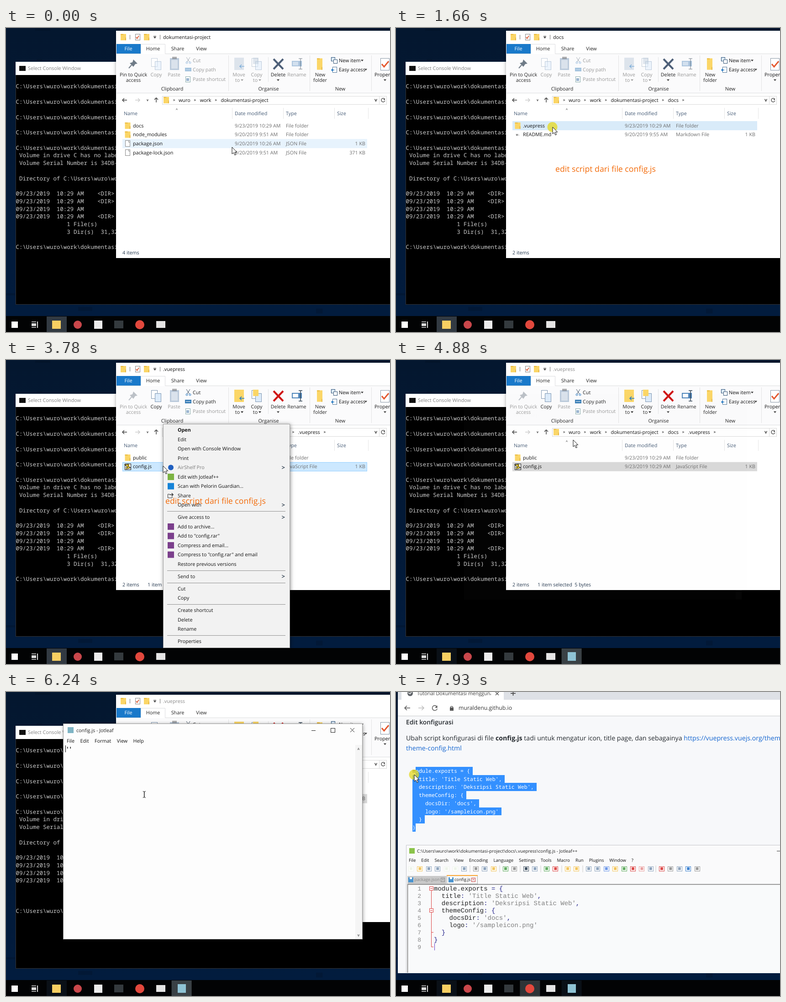
An HTML page with a canvas for the animation above (8000 ms loop, 841x666 px).

```html
<!DOCTYPE html>
<html lang="id">
<head>
<meta charset="utf-8">
<title>Edit konfigurasi</title>
<style>
html, body { margin: 0; width: 100%; height: 100%; overflow: hidden; background: #000; }
canvas { display: block; }
</style>
</head>
<body>
<canvas id="stage" width="841" height="666"></canvas>
<script>
const c = document.getElementById('stage').getContext('2d');
c.textRendering = 'geometricPrecision'; // keeps fractional glyph advances
const UI = '"Open Sans", sans-serif';
const MONO = '"Noto Sans Mono", monospace';
const COURIER = '"Liberation Mono", monospace';
const LOOP = 8000;
const USER = 'wuro';
const T = {
  openDocs: 900, openVuepress: 1960, tip: 2760, tipEnd: 3080, select: 3480, menu: 3600,
  noteEnd: 4460, menuEnd: 4860, editor: 4880, blur: 7150, browser: 7260, drag: 7480
};
const CLICKS = [[610, 700], [770, 860], [1660, 1750], [1820, 1910], [3480, 3600],
  [4750, 4850], [7110, 7200], [T.drag, LOOP]];
const PATH = [[20, 495, 261], [460, 343, 217], [2440, 343, 217], [2650, 311, 230], [3030, 311, 230],
  [3400, 344, 232], [3930, 344, 232], [4230, 388, 175], [5250, 388, 175], [6050, 302, 178],
  [6080, 302, 178], [6840, 309, 580], [6940, 309, 580], [7120, 288, 653], [7260, 288, 653],
  [7480, 44, 300], [7690, 157, 178], [7750, 157, 178], [7920, 40, 181]];
const CODE = ['module.exports = {', "  title: 'Title Static Web',", "  description: 'Deksripsi Static Web',",
  '  themeConfig: {', "    docsDir: 'docs',", "    logo: '/sampleicon.png'", '  }', '}'];
const FOLDERS = [
  [['folder', 'docs', '9/23/2019 10:29 AM', 'File folder', ''],
   ['folder', 'node_modules', '9/20/2019 9:51 AM', 'File folder', ''],
   ['file', 'package.json', '9/20/2019 10:26 AM', 'JSON File', '1 KB'],
   ['file', 'package-lock.json', '9/20/2019 9:51 AM', 'JSON File', '371 KB']],
  [['folder', '.vuepress', '9/23/2019 10:29 AM', 'File folder', ''],
   ['md', 'README.md', '9/20/2019 9:55 AM', 'Markdown File', '1 KB']],
  [['folder', 'public', '9/23/2019 10:29 AM', 'File folder', ''],
   ['js', 'config.js', '9/23/2019 10:29 AM', 'JavaScript File', '1 KB']]
];
// "-" is a separator, a trailing ">" marks a submenu
const MENU = ['Open', 'Edit', 'Open with Console Window', 'Print', 'AirShelf Pro>', 'Edit with Jotleaf++',
  'Scan with Pelorin Guardian...', 'Share', 'Open with>', '-', 'Give access to>', 'Add to archive...',
  'Add to "config.rar"', 'Compress and email...', 'Compress to "config.rar" and email',
  'Restore previous versions', '-', 'Send to>', '-', 'Cut', 'Copy', '-', 'Create shortcut', 'Delete',
  'Rename', '-', 'Properties'];

const clamp = u => Math.min(1, Math.max(0, u));
const easeOut = (t, a, b) => 1 - (1 - clamp((t - a) / (b - a))) ** 2;

function rect(x, y, w, h, color) { c.fillStyle = color; c.fillRect(x, y, w, h); }
function box(x, y, w, h, color) { c.strokeStyle = color; c.lineWidth = 1; c.strokeRect(x + .5, y + .5, w - 1, h - 1); }
function disc(x, y, r, color) { c.fillStyle = color; c.beginPath(); c.arc(x, y, r, 0, 7); c.fill(); }
function trace(points) {
  c.beginPath();
  for (let i = 0; i < points.length; i += 2) c.lineTo(points[i], points[i + 1]);
}
function line(points, color, width = 1) { trace(points); c.strokeStyle = color; c.lineWidth = width; c.stroke(); }
function poly(points, color) { trace(points); c.fillStyle = color; c.fill(); }
function text(s, x, y, color = '#111', size = 10.75, align = 'left', font = UI, weight = 400) {
  c.font = `${weight} ${size}px ${font}`;
  c.textAlign = align;
  c.fillStyle = color;
  c.fillText(s, x, y + size * .36);
  return x + c.measureText(s).width;
}
function words(list, x, y, gap, size) { for (const w of list) x = text(w, x, y, '#111', size) + gap; }
function chevron(x, y, dx, dy, color = '#555', width = 1.2) {
  line([x - dx - dy, y - dy - dx, x + dx, y + dy, x - dx + dy, y - dy + dx], color, width);
}
function down(x, y, color = '#333') { poly([x - 3, y - 1.5, x + 3, y - 1.5, x, y + 2], color); }
function arrow(x, y, dx, dy, color) {
  line([x - dx * 5, y - dy * 5, x + dx * 5, y + dy * 5], color, 1.5);
  line([x + dx - dy * 4, y + dy - dx * 4, x + dx * 5, y + dy * 5, x + dx + dy * 4, y + dy + dx * 4], color, 1.5);
}
function circleArrow(x, y, r, color) {
  c.strokeStyle = color; c.lineWidth = 1.4;
  c.beginPath(); c.arc(x, y, r, .3, 5.4); c.stroke();
  poly([x + r, y - r, x + r, y, x, y - 1], color);
}
function panel(x, y, w, h, color) {
  c.save();
  c.shadowColor = 'rgba(0,0,0,.45)'; c.shadowBlur = 8; c.shadowOffsetX = c.shadowOffsetY = 1;
  rect(x, y, w, h, color);
  c.restore();
}
function faded(on, draw) { c.save(); if (!on) c.globalAlpha *= .45; draw(); c.restore(); }

function folder(x, y, h = 14) {
  rect(x - 6, y - h / 2, 12, h, '#fbd667');
  rect(x - 6, y - h / 2, 6, 2, '#e9b93d');
  rect(x + 4, y + h / 2 - 6, 2, 6, '#e6b94a');
}
function sheet(x, y, w = 11, h = 14, fill = '#fff', edge = '#888') {
  rect(x - w / 2, y - h / 2, w, h, fill);
  box(Math.round(x - w / 2), Math.round(y - h / 2), w, h, edge);
}
function fileIcon(kind, x, y) {
  if (kind === 'folder') folder(x, y);
  else if (kind === 'md') text('M↓', x, y, '#555', 5.5, 'center', UI, 700);
  else {
    sheet(x, y, kind === 'js' ? 14 : 11, 14, '#fff', kind === 'js' ? '#111' : '#888');
    if (kind === 'js') {
      const scroll = [x + 3, y - 4, x - 3, y - 3, x + 3, y + 2, x - 4, y + 4];
      line(scroll, '#111', 4);
      line(scroll, '#f5d535', 2);
    } else line([x + 2, y - 7, x + 2, y - 3, x + 5, y - 3], '#888');
  }
}

function pointer(t) {
  let a = PATH[0];
  for (const b of PATH) {
    if (t < b[0]) {
      const u = clamp((t - a[0]) / (b[0] - a[0] || 1)), e = u * u * (3 - 2 * u);
      return [a[1] + (b[1] - a[1]) * e, a[2] + (b[2] - a[2]) * e];
    }
    a = b;
  }
  return [a[1], a[2]];
}

function desktop() {
  const g = c.createLinearGradient(0, 0, 0, 631);
  g.addColorStop(0, '#04172f'); g.addColorStop(1, '#021c3e');
  rect(0, 0, 841, 666, g);
  let seed = 7;
  const rnd = n => (seed = seed * 16807 % 2147483647) / 2147483647 * n;
  for (let i = 0; i < 60; i++) rect(rnd(841), rnd(631), 8 + rnd(40), 3 + rnd(8), 'rgba(0,12,30,.25)');
}

function terminal() {
  rect(21, 74, 820, 532, '#000');
  box(21, 74, 830, 532, '#333');
  rect(21, 74, 820, 29, '#fff');
  rect(29, 83, 14, 11, '#111');
  text('Select Console Window', 48, 88, '#808080');
  const home = `C:\\Users\\${USER}\\work\\dokumentasi-project`, prompt = home + '>';
  const entry = '09/23/2019  10:29 AM    ';
  [prompt, '', prompt, '', prompt, '', prompt, '', prompt + 'dir', ' Volume in drive C has no label.',
    ' Volume Serial Number is 34DB-', '', ' Directory of ' + home, '', entry + '<DIR>', entry + '<DIR>',
    entry, entry + '<DIR>', ' '.repeat(15) + '1 File(s)', ' '.repeat(15) + '3 Dir(s)  31,32', '', prompt
  ].forEach((s, i) => text(s, 21.5, 128 + i * 16.76, '#ccc', 12.41, 'left', MONO));
}

function ribbon(selected) {
  const ink = on => on ? '#222' : '#999';
  const label = (s, x, y, on = true) => text(s, x, y, ink(on), 10.75, 'center');
  rect(242, 57, 599, 85, '#fbfbfc');
  line([242, 56.5, 295, 56.5, 295.5, 35.5, 348.5, 35.5, 348.5, 56.5, 841, 56.5], '#dcdddf');
  line([242, 142.5, 841, 142.5], '#dcdddf');
  rect(242, 35, 53, 21, '#1979ca');
  text('File', 268, 45, '#fff', 10.75, 'center');
  label('Home', 322, 45); label('Share', 376, 45); label('View', 428, 45);
  for (const x of [487.5, 665.5, 800.5]) line([x, 60, x, 138], '#e2e3e4');
  line([574.5, 64, 574.5, 118], '#e2e3e4');

  faded(!selected, () => {
    poly([279, 69, 288, 78, 283, 79, 279, 85, 271, 77, 277, 75], '#6f7b87');
    line([275, 81, 269, 88], '#6f7b87', 2);
  });
  label('Pin to Quick', 279, 102, !selected); label('access', 279, 114, !selected);
  const copies = x => { sheet(x - 4, 75, 14, 19, '#fff', '#7f97b2'); sheet(x + 4, 82, 14, 19, '#dcebfa', '#7f97b2'); };
  faded(selected, () => copies(329));
  label('Copy', 329, 102, selected);
  faded(false, () => { rect(359, 66, 20, 26, '#6e8fb2'); rect(362, 70, 14, 19, '#fff'); rect(364, 63, 10, 5, '#555'); });
  label('Paste', 368, 102, false);
  faded(selected, () => {
    line([395, 64, 402, 75], '#456'); line([403, 64, 396, 75], '#456');
    c.beginPath(); c.arc(396, 76, 2, 0, 7); c.moveTo(405, 76); c.arc(403, 76, 2, 0, 7); c.strokeStyle = '#2a78c0'; c.stroke();
    rect(392, 87, 14, 8, '#3b7fb8'); line([394, 91, 404, 91], '#fff');
  });
  text('Cut', 409, 71, ink(selected)); text('Copy path', 409, 91, ink(selected));
  sheet(398, 112, 11, 13, '#fff', '#8aa'); rect(395, 110, 6, 6, '#9ab4cf');
  text('Paste shortcut', 409, 112, '#999');
  label('Clipboard', 364, 133);

  faded(selected, () => {
    rect(500, 65, 21, 27, selected ? '#fbd667' : '#b9c8d8');
    arrow(517, 84, -1, 0, '#1b78c8');
    copies(549); rect(541, 65, 12, 14, selected ? '#fbd667' : '#b9c8d8');
    rect(626, 72, 22, 12, '#4f86bb'); rect(628, 74, 12, 8, '#fff');
    line([641, 67, 649, 67], '#345', 1.5); line([645, 67, 645, 90], '#345', 1.5); line([641, 90, 649, 90], '#345', 1.5);
  });
  label('Move', 510, 102, selected); label('to', 507, 114, selected); down(517, 114, ink(selected));
  label('Copy', 549, 102, selected); label('to', 546, 114, selected); down(556, 114, ink(selected));
  const cross = selected ? '#cf1515' : '#4d5f78';
  line([586, 68, 607, 90], cross, 4); line([607, 68, 586, 90], cross, 4);
  label('Delete', 596, 102); down(596, 114);
  label('Rename', 637, 102, selected);
  label('Organise', 575, 133);

  folder(687, 79, 25); label('New', 688, 102); label('folder', 688, 114);
  sheet(716, 68, 9, 9, '#dcebfa', '#357'); sheet(721, 73, 9, 9, '#fff', '#357');
  sheet(720, 91, 10, 13, '#fff', '#579'); arrow(716, 92, -.6, 0, '#1b78c8');
  text('New item', 729, 71); down(780, 71);
  text('Easy access', 729, 91); down(788, 91);
  label('New', 732, 133);
  sheet(830, 79, 20, 27, '#fff', '#8896a5'); line([823, 79, 828, 85, 838, 73], '#e4572e', 3);
  text('Properties', 807, 102); down(830, 114);
}

function explorer(t, px, py) {
  const level = (t >= T.openDocs) + (t >= T.openVuepress);
  const active = t < T.editor, fileSelected = t >= T.select;
  const crumbs = [USER, 'work', 'dokumentasi-project', 'docs', '.vuepress'].slice(0, 3 + level);
  const rows = FOLDERS[level];
  panel(241, 6, 610, 498, '#fff');
  folder(257, 20); folder(308, 20);
  sheet(288, 20, 11, 14); line([285, 20, 287, 23, 291, 17], '#d9532c', 1.6);
  down(326, 21); line([323, 18, 329, 18], '#333');
  for (const x of [271.5, 337.5]) line([x, 15, x, 25], '#777');
  text(crumbs.at(-1), 344, 20, active ? '#111' : '#888');
  ribbon(fileSelected);

  arrow(260, 158, -1, 0, '#444'); arrow(288, 158, 1, 0, '#ccc'); arrow(329, 158, 0, -1, '#444');
  chevron(310, 158, 0, 1.6); chevron(810, 158, 0, 2.4, '#555', 1.6);
  box(342, 149, 492, 19, '#d9d9d9'); line([817.5, 149, 817.5, 168], '#d9d9d9');
  circleArrow(826, 158, 4, '#555');
  folder(351, 158);
  chevron(368, 158, 1.5, 0);
  let x = 378;
  crumbs.forEach((s, i) => {
    x = text(s, x, 158) + 21;
    if (i < crumbs.length - 1 || level) chevron(x - 11, 158, 1.5, 0);
  });

  [['Name', 258], ['Date modified', 501], ['Type', 613], ['Size', 725]].forEach(([s, hx]) => text(s, hx, 187, '#445a75'));
  for (const sx of [495.5, 607.5, 719.5, 793.5]) line([sx, 175, sx, 199], '#e5e5e5');
  chevron(374, 178, 0, -1.6, '#777', 1);

  const hovered = t < T.menu && px > 255 && px < 791 ? Math.floor((py - 204) / 19.6) : -1;
  const picked = fileSelected ? 1 : (t >= 610 && !level) || (t >= 1660 && level === 1) ? 0 : -1;
  rows.forEach(([kind, name, date, type, size], i) => {
    const y = 214 + i * 19.6;
    if (i === picked) rect(255, y - 10, 536, 20, !active ? '#d9d9d9' : fileSelected ? '#cce8ff' : '#d9ebf9');
    else if (i === hovered) rect(255, y - 10, 536, 20, '#e7f3fd');
    if (i === picked && fileSelected && active) box(255, Math.round(y - 10), 536, 20, '#99d1ff');
    fileIcon(kind, 266.5, y);
    text(name, 278, y);
    text(date, 501, y, '#6d6d6d'); text(type, 613, y, '#6d6d6d'); text(size, 787, y, '#6d6d6d', 10.75, 'right');
  });
  text(rows.length + ' items', 255, 492, '#23364d');
  if (fileSelected) text('1 item selected  5 bytes', 310, 492, '#23364d');
}

function tooltip() {
  panel(321, 243, 185, 46, '#fff');
  box(321, 243, 185, 46, '#767676');
  ['Type: JavaScript File', 'Size: 5 bytes', 'Date modified: 9/23/2019 10:29 AM']
    .forEach((s, i) => text(s, 326, 251.5 + i * 14, '#575757'));
}

function contextMenu(px, py) {
  panel(344, 140, 278, 491, '#f2f2f2');
  box(344, 140, 278, 491, '#a5a5a5');
  const marks = { 5: '#7cb342', 6: '#1583d8', 11: '#7b3f8c', 12: '#7b3f8c', 13: '#7b3f8c', 14: '#7b3f8c' };
  let y = 153.5;
  MENU.forEach((item, i) => {
    if (item === '-') {
      line([353, Math.round(y - 7) + .5, 612, Math.round(y - 7) + .5], '#919191');
      y += 6.5;
      return;
    }
    if (px > 346 && Math.abs(py - y) < 10.25) rect(346, y - 10, 273, 20.5, '#91c9f7');
    text(item.replace('>', ''), 376, y, i === 4 ? '#7a7a7a' : '#111', 10.75, 'left', UI, i ? 400 : 700);
    if (item.endsWith('>')) chevron(607, y, 2.8, 0, '#234', 1.1);
    if (i === 4) disc(361, y, 6, '#1f5fc0');
    if (i === 7) { line([358, y - 3, 354.5, y - 3, 354.5, y + 5, 364, y + 5, 364, y + 2], '#333'); arrow(362, y - 2, .8, 0, '#333'); }
    if (marks[i]) rect(354, y - 7, 14, 14, marks[i]);
    y += 20.5;
  });
}

function openWindow(t, start, cx, cy, draw) {
  const s = .93 + .07 * easeOut(t, start, start + 130);
  c.save();
  c.globalAlpha = easeOut(t, start, start + 200);
  c.translate(cx, cy); c.scale(s, s); c.translate(-cx, -cy);
  draw();
  c.restore();
}

function editor(t) {
  const ink = t < T.blur ? '#222' : '#777';
  panel(126, 70, 654, 471, '#fdfdfd');
  box(125, 69, 656, 473, '#9a9a9a');
  rect(135, 77, 13, 13, '#7fb4c4');
  text('config.js - Jotleaf', 154, 84, ink);
  words(['File', 'Edit', 'Format', 'View', 'Help'], 133, 107, 12.5);
  line([669, 84.5, 678, 84.5], ink); box(711, 79, 10, 10, ink);
  line([754, 79, 763, 88], ink); line([763, 79, 754, 88], ink);
  rect(765, 116, 15, 425, '#f5f5f5');
  chevron(772, 125, 0, -1.8, '#888', 1.6); chevron(772, 533, 0, 1.8, '#888', 1.6);
  rect(134, 120, 1.5, 4, '#222'); rect(140.5, 120, 1.5, 4, '#222');
  if (t < T.blur && Math.floor((t - 4950) / 530) % 2 === 0) rect(130, 117, 1, 15, '#000');
}

function codeEditor() {
  rect(22, 335, 819, 280, '#fafafb');
  line([22.5, 615, 22.5, 335.5, 841, 335.5], '#c4c6ca');
  rect(29, 342, 12, 12, '#8bc34a');
  text(`C:\\Users\\${USER}\\work\\dokumentasi-project\\docs\\.vuepress\\config.js - Jotleaf++`, 46, 348, '#222', 9.8);
  line([834, 348.5, 841, 348.5], '#333');
  words(['File', 'Edit', 'Search', 'View', 'Encoding', 'Language', 'Settings', 'Tools', 'Macro', 'Run', 'Plugins', 'Window', '?'], 28, 369, 12, 9.7);
  const [W, Y, B, G, R] = ['#eef4ea', '#f3c65f', '#8ea4bd', '#63ad63', '#dd4b4b'];
  [[33, W, Y, B, B, W, W, B], [175, '#999', B, Y], [240, G, '#999'], [285, '#456', B], [330, G, R], [376, Y, Y],
    [422, B, B, '#6f98e8', Y, G, R, '#e9a0a0', B], [582, R, '#999', B, '#3f83d0', '#999']]
    .forEach(([x0, ...colors], g) => colors.forEach((color, i) => {
      const x = x0 + i * 19.4;
      sheet(x, 387, 12, 11, '#fff', color);
      rect(x - 3, 384, 6, 6, color);
      if (g && !i) line([x - 13, 380, x - 13, 395], '#ccc');
    }));
  rect(25, 403, 85, 18, '#c9c9c9'); rect(111, 401, 68, 20, '#f6f6f6');
  box(111, 401, 68, 20, '#aaa'); rect(111, 401, 68, 2, '#faa634');
  for (const [s, x, close, ink, mark] of [['package.json', 27, 102, '#888', '#888'], ['config.js', 115, 169, '#222', '#c44']]) {
    rect(x, 406, 11, 11, '#4a94cf'); rect(x + 3, 406, 5, 4, '#fff');
    text(s, x + 13, 411, ink, 9.2);
    box(close - 4, 407, 9, 9, mark); text('×', close + .5, 411, mark, 9, 'center');
  }
  rect(25, 421, 816, 194, '#f9fafb');
  line([25.5, 615, 25.5, 421.5, 841, 421.5], '#777', 1.5);
  for (let i = 0; i < 9; i++) text(String(i + 1), 55, 430 + i * 16, '#888', 13, 'right', COURIER);
  CODE.forEach((s, i) => {
    let x = 83;
    for (const part of s.split(/('[^']*'|[{}=:,])/)) {
      const color = part[0] === "'" ? '#808080' : /^[{}=:,]/.test(part) ? '#20208a' : '#222';
      x = text(part, x, 430 + i * 16, color, 14, 'left', COURIER);
    }
  });
  line([77.5, 434, 77.5, 558.5, 82, 558.5], '#d44'); line([77, 526.5, 82, 526.5], '#d44');
  for (const y of [426, 474]) { rect(73, y, 9, 9, '#fff'); box(73, y, 9, 9, '#d44'); line([75, y + 4.5, 80, y + 4.5], '#d44'); }
  rect(84, 551, 1, 15, '#6a3cc8');
}

function codeBlock(t, px, py) {
  const cw = 7, lh = 17.7, x0 = 36, y0 = 164, newline = 6;
  const headLine = Math.min(7, Math.max(0, Math.floor((py - y0) / lh)));
  const headCol = Math.max(0, Math.round((px - x0) / cw));
  CODE.forEach((s, i) => {
    const y = Math.round(y0 + i * lh), next = Math.round(y0 + (i + 1) * lh);
    const from = t < T.drag || i < headLine ? Infinity : i > headLine ? 0 : Math.min(headCol, s.length);
    const left = x0 + from * cw, right = x0 + s.length * cw + (i < 7 ? newline : 0);
    if (left < right) rect(left, y, right - left, next - y, '#3390ff');
    text(s.slice(0, from), x0, y + 9, '#24292e', cw / .6, 'left', MONO);
    if (left < right) text(s.slice(from), left, y + 9, '#fff', cw / .6, 'left', MONO);
  });
}

function browser(t, px, py) {
  rect(4, -10, 837, 626, '#f7f8fa');
  rect(4, -10, 837, 28, '#dee1e6');
  rect(12, -10, 224, 28, '#fff');
  rect(4, 17, 837, 35, '#fff');
  rect(4, 52, 837, 1, '#c9cbce');
  disc(31, 3, 6, '#5f6368'); line([27, 2, 31, 4, 34, 0], '#fff', 1.4);
  c.save(); c.beginPath(); c.rect(40, 0, 168, 18); c.clip();
  text('Tutorial Dokumentasi menggunakan', 46, 3, '#444', 10.9);
  c.restore();
  line([218, 0, 225, 7], '#555', 1.4); line([225, 0, 218, 7], '#555', 1.4);
  line([251, 3, 262, 3], '#444', 1.7); line([256.5, -3, 256.5, 8], '#444', 1.7);
  arrow(25, 35, -1.2, 0, '#555'); arrow(55, 35, 1.2, 0, '#bbb'); circleArrow(85, 35, 5.5, '#555');
  rect(118, 34, 8, 7, '#555'); c.strokeStyle = '#555'; c.lineWidth = 1.3; c.beginPath(); c.arc(122, 34, 2.6, 3.14, 6.28); c.stroke();
  text('muraldenu.github.io', 137, 35, '#333', 12.3);

  const ink = '#24292e', link = '#1566d0';
  text('Edit konfigurasi', 22, 66, ink, 13.8, 'left', UI, 600);
  let x = text('Ubah script konfigurasi di file ', 22, 101, ink, 14.2);
  x = text('config.js', x, 101, ink, 14.2, 'left', UI, 700);
  x = text(' tadi untuk mengatur icon, title page, dan sebagainya ', x, 101, ink, 14.2);
  text('https://vuepress.vuejs.org/theme/default-', x, 101, link, 14.2);
  text('theme-config.html', 22, 123, link, 14.2);
  codeBlock(t, px, py);
  codeEditor();
}

function taskbar(t) {
  const slot = (i, color) => rect(89 + i * 45.6, 632, 44, 34, color);
  rect(0, 631, 841, 35, '#020304');
  slot(0, t < T.editor ? '#323a42' : '#0a1017');
  if (t >= T.editor) slot(6, t < T.browser + 60 ? '#3a4145' : '#0a1017');
  if (t >= 7080) slot(4, '#2e3437');
  rect(12, 643, 14, 14, '#fff');
  for (const y of [643, 647, 655]) rect(56, y, 10, y === 647 ? 6 : 1.5, '#ddd');
  rect(68, 643, 2, 14, '#ddd');
  rect(101, 641, 19, 18, '#f7cf62');
  disc(157, 650, 9, '#c9474b');
  rect(193, 641, 18, 18, '#ececec');
  rect(237, 641, 20, 17, '#343a3e');
  disc(293, 650, 10, '#e2483d');
  rect(329, 642, 20, 15, '#e4e4e4');
  if (t >= T.editor) rect(376, 640, 18, 19, '#8fc3d4');
}

function cursor(t, x, y) {
  if (CLICKS.some(([a, b]) => t >= a && t < b)) disc(x - .5, y, 11, 'rgba(228,216,30,.75)');
  if (t > T.editor + 100 && t < T.browser && y < 541) {
    line([x - 3, y - 7, x, y - 6, x + 3, y - 7], '#111');
    line([x, y - 6, x, y + 6], '#111', 1.4);
    line([x - 3, y + 7, x, y + 6, x + 3, y + 7], '#111');
    return;
  }
  const shape = [0, 0, 0, 15, 3.5, 12, 6, 17.5, 8.5, 16.5, 6, 11, 10.7, 11, 0, 0].map((v, i) => v + (i % 2 ? y : x));
  poly(shape, '#fff');
  line(shape, '#111');
}

function draw() {
  const t = performance.now() % LOOP;
  const [px, py] = pointer(t);
  desktop();
  terminal();
  explorer(t, px, py);
  if (t >= T.tip && t < T.tipEnd) tooltip();
  if (t >= T.editor) openWindow(t, T.editor, 453, 305, () => editor(t));
  if (t >= T.browser) openWindow(t, T.browser, 420, 310, () => browser(t, px, py));
  taskbar(t);
  if (t >= T.menu && t < T.menuEnd) contextMenu(px, py);
  if (t >= 20 && t < T.noteEnd) text('edit script dari file config.js', 349, 309, '#f36b0a', 17.65);
  cursor(t, px, py);
  requestAnimationFrame(draw);
}
draw();
</script>
</body>
</html>
```
